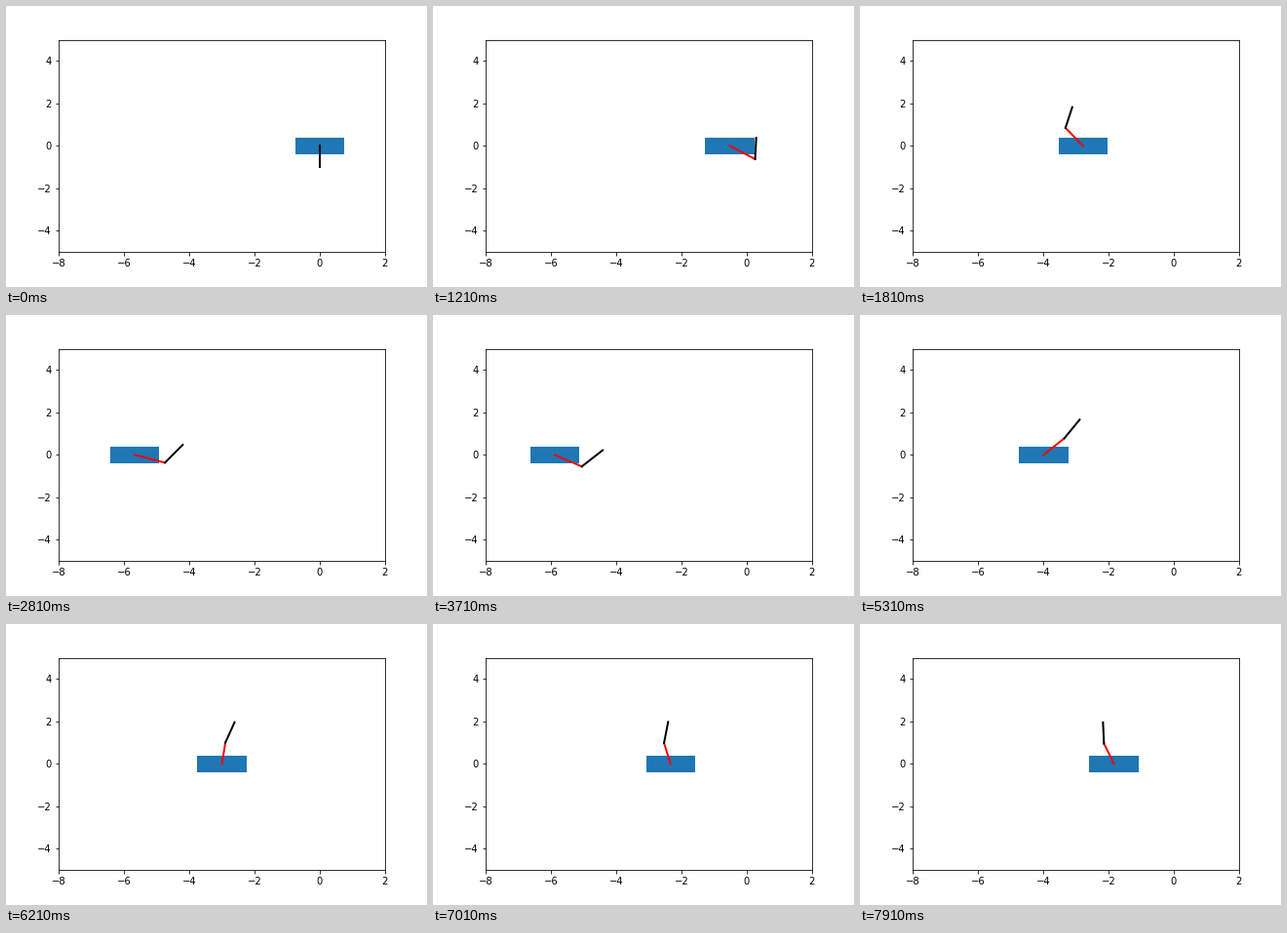
A matplotlib script that plays this animation: 432x288 px, repeating every 8 s.

```python
import numpy as np
import matplotlib.pyplot as plt
from matplotlib.animation import FuncAnimation
from matplotlib.patches import Rectangle

FRAMES, STEP_MS, HOLD = 80, 100, 9
CART_W, CART_H = 1.5, 0.8

# Key poses: step, cart position, lower and upper link angles from vertical
STEPS, *POSES = np.array([
    (0, 0, np.pi, 0),              # folded at rest
    (9, -2.78, -0.565, 0.21),      # swung up
    (19, -5.67, 1.95, 0.575),      # fallen over to the right
    (27, -5.93, 2.19, 0.69),       # turning back
    (36, -5.025, 1.43, 0.67),
    (44, -3.985, 0.685, 0.49),
    (53, -2.995, 0.105, 0.285),
    (70, -1.83, -0.31, -0.03),     # balancing
]).T


def smooth(values, t):
    """Cubic Hermite curve through the key values, starting from rest."""
    slopes = np.gradient(values, STEPS, edge_order=2)
    slopes[0] = 0
    k = min(np.searchsorted(STEPS, t, side="right"), len(STEPS) - 1) - 1
    h = STEPS[k + 1] - STEPS[k]
    s = (t - STEPS[k]) / h
    ease = s * s * (3 - 2 * s)
    bend = s * (1 - s) * h * ((1 - s) * slopes[k] - s * slopes[k + 1])
    return values[k] + (values[k + 1] - values[k]) * ease + bend


fig = plt.figure(figsize=(6, 4), dpi=72, facecolor="white")
ax = fig.add_axes([0.125, 0.125, 0.775, 0.755])
ax.set(xlim=(-8, 2), ylim=(-5, 5))
ax.set_xticks(range(-8, 3, 2))
ax.set_yticks(range(-4, 5, 2))

cart = ax.add_patch(Rectangle((0, -CART_H / 2), CART_W, CART_H, color="C0", lw=0))
lower, = ax.plot([], [], color="red", lw=2)
upper, = ax.plot([], [], color="black", lw=2)


def draw(i):
    x, a, b = (smooth(p, max(0, i - HOLD)) for p in POSES)
    jx, jy = x + np.sin(a), np.cos(a)
    cart.set_x(x - CART_W / 2)
    lower.set_data([x, jx], [0, jy])
    upper.set_data([jx, jx + np.sin(b)], [jy, jy + np.cos(b)])
    return cart, lower, upper


anim = FuncAnimation(fig, draw, frames=FRAMES, interval=STEP_MS,
                     init_func=lambda: draw(0), repeat=True, repeat_delay=0)
plt.show()
```
